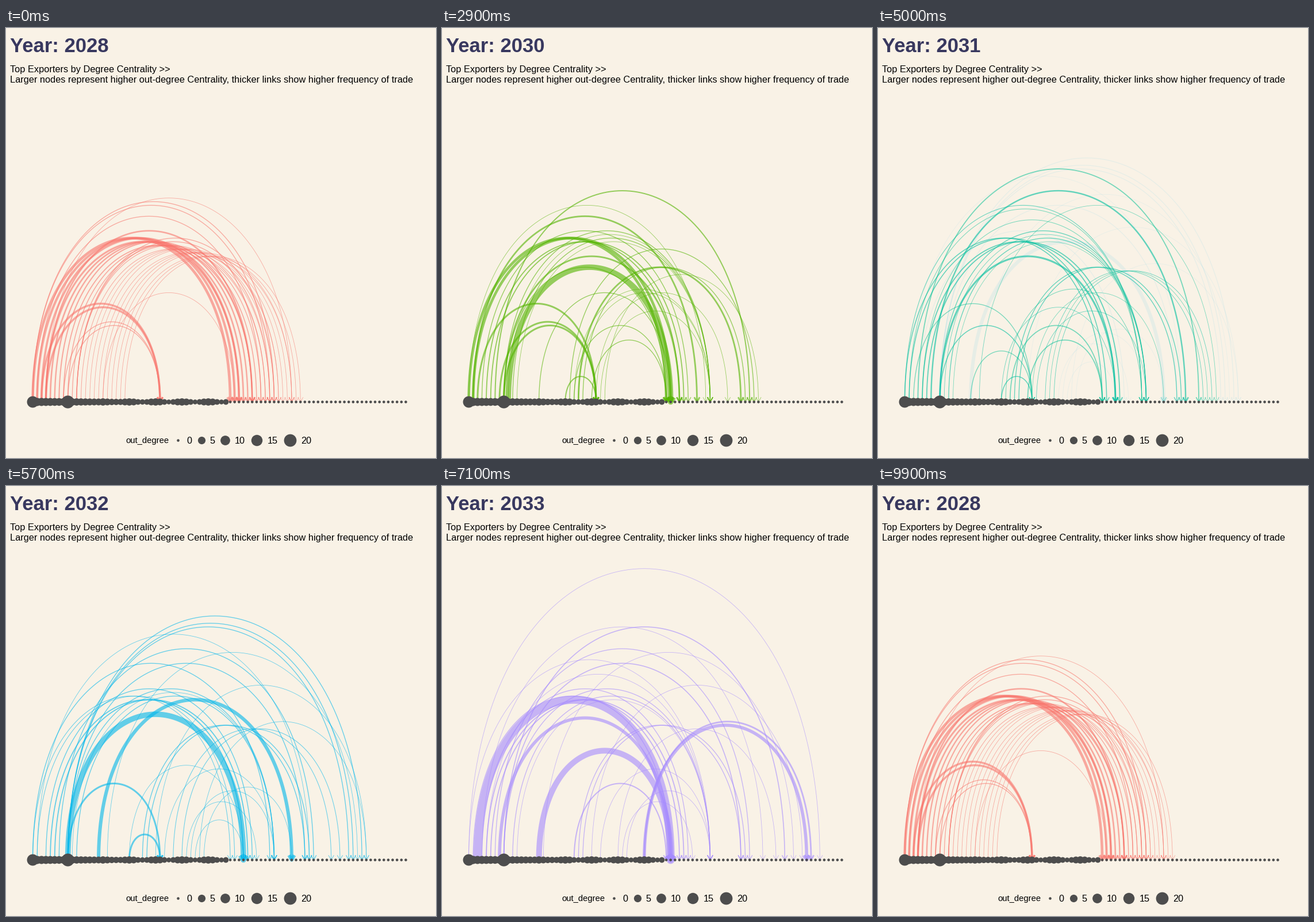
Animation of 748 by 748 pixels, one loop 10 s. Source, as a matplotlib script:

```python
from itertools import product

import numpy as np
import matplotlib.pyplot as plt
from matplotlib.animation import FuncAnimation
from matplotlib.collections import LineCollection
from matplotlib.colors import to_rgb

SIZE, DPI = 748, 64
PX = 72 / DPI                      # points per pixel
FRAMES, INTERVAL = 100, 100
BACKGROUND, NODE_COLOR, TITLE_COLOR = "#F9F2E6", "#4D4D4D", "#38385F"
EDGE_ALPHA = 0.6

LEFT, STEP, BASELINE = 46, 7.635, 650
RISE = 6.335                       # arc height per node of span
NODE_COUNT, EXPORTERS = 86, 45
HAIR, FINE = 0.8, 1.3              # usual line widths


def links(sources, targets, width=HAIR):
    """Join every source to every target."""
    return dict.fromkeys(product(sources, targets), width)


def fan(sources, span, width=HAIR, drift=0, decay=1):
    """Parallel arcs whose span drifts and whose width decays."""
    return {(s, s + round(span + drift * k)): max(HAIR, width * decay**k)
            for k, s in enumerate(sources)}


def thin(*pairs):
    return dict.fromkeys(pairs, HAIR)


def broad_fan(count):
    return fan(range(count), 45, 4.6, drift=-5 / 21, decay=0.87)


# Routes in use from the third year on.
LASTING = (fan((4, 5), 44, 1.8) | links((8, 10), [55], FINE)
           | fan((25, 26), 37, FINE))

YEARS = [
    (2028, "#F8766D",
     broad_fan(22) | links((2, 3), [29], 3.4) | links((7, 8), [29], FINE)
     | links((0, 10), (54, 55), FINE) | thin((3, 59), (16, 46))
     | {(1, 52): FINE, (3, 50): 2.6}),
    (2029, "#C49A00",
     broad_fan(18) | links((2, 7, 8), [29], 2.8) | fan((25, 26), 37, FINE)
     | {(1, 52): 2, (3, 50): 2, (8, 48): 2.4, (9, 46): 3.6}),
    (2030, "#53B400",
     LASTING | fan((0, 1), 45, 4.6) | links((2, 7, 8), [29], 3)
     | links((9, 11, 24, 25, 30), [55]) | links((8, 24, 28), [45], FINE)
     | thin((0, 54), (31, 66), (29, 59))
     | {(1, 52): 2.8, (3, 50): FINE, (6, 64): 2, (8, 48): 2.8, (9, 46): 9.5,
        (16, 46): FINE, (22, 29): 2, (23, 65): FINE, (25, 62): 2.8}),
    (2031, "#00C094",
     LASTING | fan((0, 1), 45, 1.6) | links((2, 8, 15, 22), [29], FINE)
     | links((9, 11, 30), [55]) | links((0, 1, 4, 23), [54], 1)
     | links((24, 28), [45], 1.7) | fan((32, 33, 34), 36)
     | thin((17, 71), (29, 59), (22, 48))
     | {(3, 67): 1.8, (6, 64): 2.6, (8, 48): 2.2}),
    (2032, "#00B6EB",
     LASTING | fan((0, 1), 45, 1) | links((8, 22), [29], 3)
     | links((9, 30, 36), [55]) | links([8], (62, 72, 73, 75), FINE)
     | links((28, 38), [76]) | fan((32, 34), 36, 1)
     | thin((1, 63), (17, 74), (22, 48), (35, 51), (37, 48), (39, 59))
     | {(0, 54): FINE, (3, 50): FINE, (6, 64): FINE,
        (8, 48): 9.5, (15, 59): 6}),
    (2033, "#A58AFF",
     LASTING | links([8], (62, 72), 1.6) | links((0, 4, 11, 30, 36), [55])
     | thin((0, 80), (3, 67), (17, 74), (28, 76), (34, 70), (35, 51))
     | {(1, 46): FINE, (2, 46): 14, (3, 50): FINE, (6, 64): FINE,
        (7, 46): 5.5, (16, 46): 10, (24, 45): 2, (40, 77): 5.5,
        (40, 78): 2.8}),
    (2034, "#FB61D7",
     LASTING | links((0, 8), [81], 2) | links((0, 4, 11, 12, 36), [55], 1)
     | fan((43, 44), 40, drift=1)
     | thin((0, 65), (3, 67), (7, 46), (10, 84), (12, 50), (16, 82),
            (28, 76), (42, 63))
     | {(0, 80): 2.6, (1, 46): 3.4, (5, 49): 2.6, (16, 46): 10.5,
        (24, 45): 1.8, (34, 70): FINE, (40, 77): 1.8}),
]


def out_degree(i):
    """Falls along the row, with a bump at every sixth node and two hubs."""
    if i >= EXPORTERS:
        return 0
    bump = 1 + 3.5 * np.cos(np.pi * (i - 4) / 6) ** 2
    return {0: 16, 8: 21}.get(i, max(6.5 - 0.2 * i, bump))


def node_x(index):
    return LEFT + STEP * index


def radius(degree):
    return 2.3 + 8.8 * np.sqrt(np.asarray(degree) / 21)


def arc(pair):
    """Cubic Bezier whose handles stand straight above both ends."""
    start, end = pair
    t = np.linspace(0, 1, 101)
    x = node_x(start) + STEP * (end - start) * (3 * t**2 - 2 * t**3)
    y = BASELINE - 4 * RISE * (end - start) * t * (1 - t)
    return np.column_stack([x, y])


def arrow(pair):
    x = node_x(pair[1])
    return np.array([(x - 4.7, BASELINE - 8.2), (x, BASELINE),
                     (x + 4.7, BASELINE - 8.2)])


def timeline(frame):
    """Return current year, next year and progress between them."""
    for k, current in enumerate(YEARS):
        leave = 5 + 14 * k + min(k, 2)
        steps = 9 if k < 3 else 8
        if frame < leave + steps:
            following = YEARS[(k + 1) % len(YEARS)]
            return current, following, max(0, frame - leave) / steps
    return YEARS[0], YEARS[1], 0


def blend(a, b, p):
    return a + (b - a) * p


fig = plt.figure(figsize=(SIZE / DPI, SIZE / DPI), dpi=DPI,
                 facecolor=BACKGROUND)
ax = fig.add_axes([0, 0, 1, 1])
ax.set(xlim=(-0.5, SIZE - 0.5), ylim=(SIZE - 0.5, -0.5))  # pixel centres
ax.axis("off")


def label(x, y, text, px, **style):
    style = {"color": "black", **style}
    return ax.text(x, y, text, fontsize=px * PX, family="Liberation Sans",
                   va="baseline", **style)


def dots(x, y, degree):
    ax.scatter(x, y, s=(2 * radius(degree) * PX) ** 2, color=NODE_COLOR,
               linewidths=0, zorder=3)


title = label(6.5, 41, "", 34.67, weight="bold", color=TITLE_COLOR)
label(6.5, 76, "Top Exporters by Degree Centrality >>", 16.36)
label(6.5, 94, "Larger nodes represent higher out-degree Centrality, "
               "thicker links show higher frequency of trade", 16.36)

edges = LineCollection([], joinstyle="round", capstyle="butt", zorder=2)
ax.add_collection(edges, autolim=False)

nodes = np.arange(NODE_COUNT)
dots(node_x(nodes), np.full(NODE_COUNT, BASELINE),
     [out_degree(i) for i in nodes])

label(208, 722, "out_degree", 14.8)
for value, dot_x, text_x in [(0, 298.5, 313.5), (5, 339.5, 354),
                             (10, 381, 397.5), (15, 436, 454),
                             (20, 493.5, 512.5)]:
    dots([dot_x], [716.5], [value])
    label(text_x, 723, str(value), 16.3)


def update(frame):
    (year, hue, old), (next_year, next_hue, new), p = timeline(frame)
    title.set_text(f"Year: {next_year if p > 0.5 else year}")
    color, next_color = np.array(to_rgb(hue)), np.array(to_rgb(next_hue))
    segments, colors, widths = [], [], []

    def add(pair, rgb, opacity, width):
        if opacity > 0:
            segments.extend([arc(pair), arrow(pair)])
            colors.extend([(*rgb, EDGE_ALPHA * opacity)] * 2)
            widths.extend([width * PX] * 2)

    for pair, width in old.items():
        if pair in new:
            add(pair, blend(color, next_color, p), 1,
                blend(width, new[pair], p))
        else:
            add(pair, color, 1 - p, width)
    for pair, width in new.items():
        if pair not in old:
            add(pair, next_color, p, width)

    edges.set_segments(segments)
    edges.set_color(colors)
    edges.set_linewidth(widths)
    return edges, title


animation = FuncAnimation(fig, update, frames=FRAMES, interval=INTERVAL,
                          repeat=True, repeat_delay=0, blit=False)
plt.show()
```
